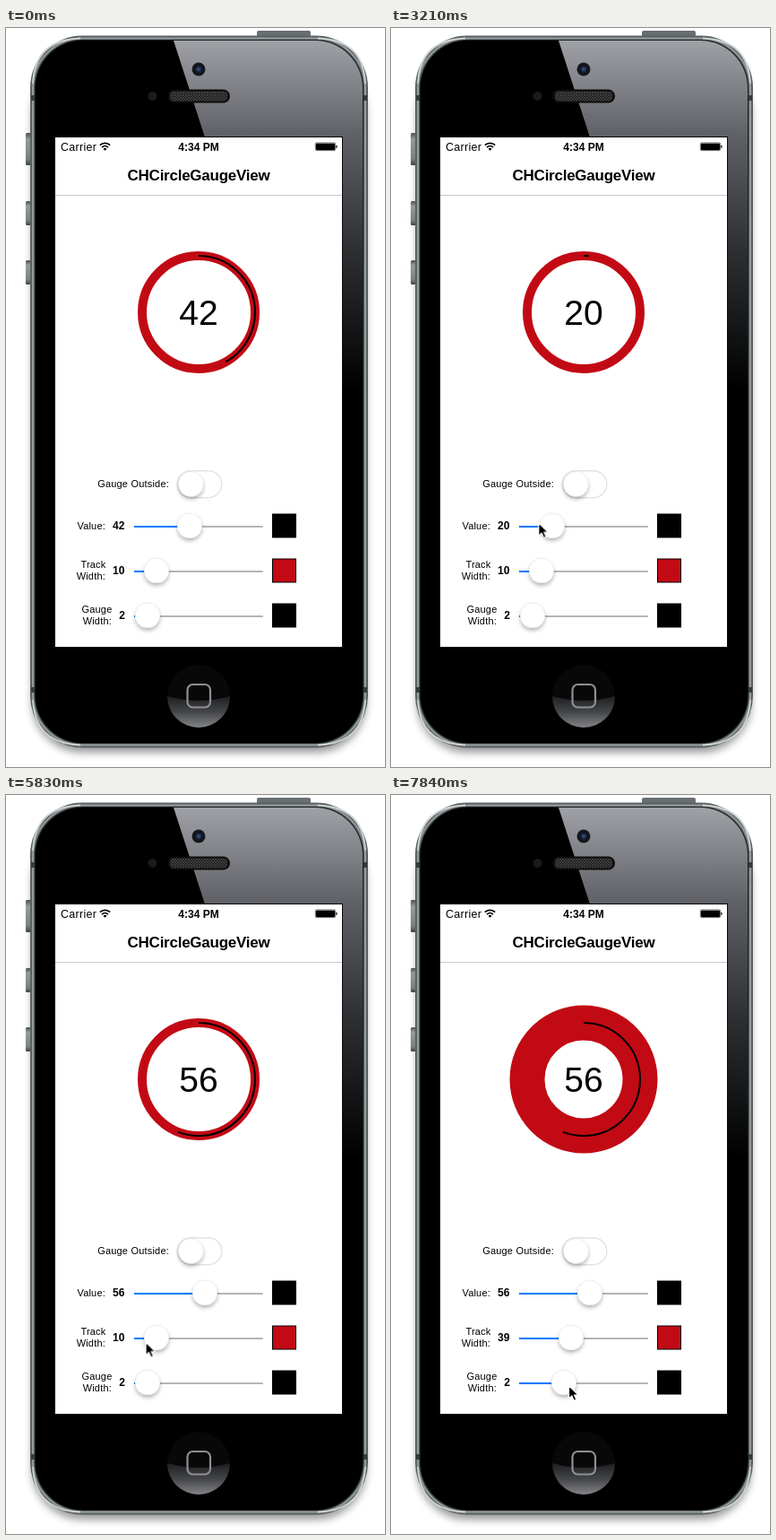
An HTML page for the animation above (8 s loop, 423 px wide and 824 px high).

```html
<!DOCTYPE html>
<html lang="en">
<head>
<meta charset="utf-8">
<title>Circle gauge demo</title>
<style>
html, body { margin: 0; width: 100%; height: 100%; overflow: hidden; background: #fff; }
svg { display: block; width: 423px; height: 824px; }
text { font-family: "Liberation Sans", Arial, Helvetica, sans-serif; }
.label { font-size: 11px; letter-spacing: .2px; text-anchor: end; }
.num { font-size: 12px; font-weight: bold; text-anchor: middle; }
.big { font-size: 39px; text-anchor: middle; }

.cursor, .value, .track, .gauge, .arc, .ring, .step { animation: 8s linear infinite; }
.cursor { animation-name: cursor; }
.value { animation-name: value; }
.track { animation-name: track; }
.gauge { animation-name: gauge; }
.arc { animation-name: arc; }
.ring { animation-name: ring; }
.step { animation-timing-function: step-end; }
.v42 { animation-name: v42; }
.v20 { animation-name: v20; }
.v56 { animation-name: v56; }
.t10 { animation-name: t10; }
.t39 { animation-name: t39; }

@keyframes cursor {
  0%, 12.8% { transform: translate(277px, 826px); }
  13.4% { transform: translate(276px, 812px); }
  16.5% { transform: translate(252px, 742px); }
  21.5% { transform: translate(210px, 639px); }
  22.9% { transform: translate(204px, 617px); animation-timing-function: ease-out; }
  31%, 32.75% { transform: translate(190.5px, 556px); animation-timing-function: ease-in-out; }
  37%, 38% { transform: translate(166px, 551px); animation-timing-function: ease-in-out; }
  45% { transform: translate(157px, 552px); animation-timing-function: ease-in-out; }
  50.25% { transform: translate(166.5px, 551px); }
  53% { transform: translate(177px, 551px); animation-timing-function: ease-in-out; }
  57.1%, 63.9% { transform: translate(218.5px, 551px); animation-timing-function: ease-in-out; }
  73.5%, 75.1% { transform: translate(155px, 610px); animation-timing-function: ease-in-out; }
  78.5%, 80.8% { transform: translate(188px, 611px); }
  84.6% { transform: translate(192px, 634px); animation-timing-function: ease-out; }
  89.5%, 92.6% { transform: translate(168px, 658px); }
  98%, 100% { transform: translate(198px, 658px); }
}
@keyframes value {
  0%, 32.75% { transform: translate(205px, 555px); animation-timing-function: ease-in-out; }
  37%, 53% { transform: translate(180px, 555px); animation-timing-function: ease-in-out; }
  57.1%, 100% { transform: translate(222px, 555px); }
}
@keyframes track {
  0%, 75.1% { transform: translate(168px, 605px); animation-timing-function: ease-in-out; }
  78.5%, 100% { transform: translate(201px, 605px); }
}
@keyframes gauge {
  0%, 92.6% { transform: translate(158px, 655px); }
  98%, 100% { transform: translate(193px, 655px); }
}
@keyframes arc {
  0%, 37.74% { stroke-dasharray: 42 100; }
  37.75% { stroke-dasharray: 0 100; animation-timing-function: ease-in-out; }
  50.25%, 57.59% { stroke-dasharray: 20 100; }
  57.6% { stroke-dasharray: 0 100; animation-timing-function: ease-in-out; }
  70.1%, 100% { stroke-dasharray: 56 100; }
}
@keyframes ring {
  0%, 79.95% { stroke-width: 10px; animation-timing-function: ease; }
  83.05%, 100% { stroke-width: 39px; }
}
@keyframes v42 { 0% { opacity: 1; } 37.75%, 100% { opacity: 0; } }
@keyframes v20 { 0% { opacity: 0; } 37.75% { opacity: 1; } 57.6%, 100% { opacity: 0; } }
@keyframes v56 { 0% { opacity: 0; } 57.6%, 100% { opacity: 1; } }
@keyframes t10 { 0% { opacity: 1; } 79.95%, 100% { opacity: 0; } }
@keyframes t39 { 0% { opacity: 0; } 79.95%, 100% { opacity: 1; } }
</style>
</head>
<body>
<svg viewBox="0 0 423 824" xmlns="http://www.w3.org/2000/svg">
  <defs>
    <linearGradient id="gloss" gradientUnits="userSpaceOnUse" x1="0" y1="14" x2="0" y2="405">
      <stop offset="0" stop-color="#a0a1a6"/>
      <stop offset=".27" stop-color="#606166"/>
      <stop offset=".6" stop-color="#2e2f32"/>
      <stop offset="1" stop-color="#000"/>
    </linearGradient>
    <linearGradient id="home" x1="0" y1="0" x2="0" y2="1">
      <stop offset="0" stop-color="#1d1e20"/>
      <stop offset=".5" stop-color="#444548"/>
      <stop offset="1" stop-color="#838488"/>
    </linearGradient>
    <linearGradient id="side" x1="0" y1="0" x2="0" y2="1">
      <stop offset="0" stop-color="#4a5052"/>
      <stop offset=".2" stop-color="#959b9d"/>
      <stop offset=".8" stop-color="#7b8183"/>
      <stop offset="1" stop-color="#3c4244"/>
    </linearGradient>
    <radialGradient id="lens">
      <stop offset="0" stop-color="#3f5f92"/>
      <stop offset=".5" stop-color="#1c2b48"/>
      <stop offset="1" stop-color="#0a0c12"/>
    </radialGradient>
    <pattern id="mesh" width="3" height="3" patternUnits="userSpaceOnUse">
      <rect width="3" height="3" fill="#1b1b1c"/>
      <path d="M0 0L3 3M3 0L0 3" stroke="#555658" stroke-width=".6"/>
    </pattern>
    <filter id="blur" x="-10%" y="-10%" width="120%" height="120%"><feGaussianBlur stdDeviation="5"/></filter>
    <filter id="lift" x="-40%" y="-40%" width="180%" height="190%">
      <feDropShadow dx="0" dy="3" stdDeviation="2" flood-color="#000" flood-opacity=".27"/>
    </filter>
    <clipPath id="face"><rect x="33" y="14" width="365" height="783" rx="53"/></clipPath>
    <clipPath id="lane"><rect x="143" y="530" width="144" height="150"/></clipPath>
    <g id="knob">
      <circle r="14" fill="#fff" filter="url(#lift)"/>
      <circle r="14" fill="none" stroke="#000" stroke-opacity=".12" stroke-width=".6"/>
    </g>
    <rect id="fill" x="-150" width="150" height="2" fill="#007aff"/>
    <rect id="rail" x="143" width="144" height="2" rx="1" fill="#b5b5b5"/>
  </defs>

  <!-- phone body -->
  <rect x="29" y="40" width="373" height="768" rx="56" fill="#000" opacity=".4" filter="url(#blur)"/>
  <g fill="url(#side)">
    <rect x="22" y="117" width="6" height="36" rx="1.5"/>
    <rect x="22" y="193" width="6" height="27" rx="1.5"/>
    <rect x="22" y="259" width="6" height="27" rx="1.5"/>
  </g>
  <rect x="280" y="3" width="60" height="7" rx="2" fill="#686e70"/>
  <rect x="27" y="8.500" width="377" height="794" rx="58" fill="#596163"/>
  <rect x="30" y="11.500" width="371" height="788" rx="55" fill="none" stroke="#959b9d" stroke-width="2"/>
  <g fill="none" stroke="#cfd2d3" stroke-width="1.800">
    <path d="M30 62Q32 13 83 11.500"/>
    <path d="M348 11.500Q399 13 401 62"/>
    <path d="M30 749Q32 798 83 799.500"/>
    <path d="M348 799.500Q399 798 401 749"/>
  </g>
  <g fill="#343b3d">
    <rect x="28" y="75" width="5" height="6"/>
    <rect x="398" y="75" width="5" height="6"/>
    <rect x="28" y="735" width="5" height="6"/>
    <rect x="398" y="735" width="5" height="6"/>
  </g>
  <rect x="32" y="13" width="367" height="785" rx="54" fill="#1b1e1f"/>
  <g clip-path="url(#face)">
    <rect x="33" y="14" width="365" height="783" fill="#000"/>
    <path d="M187 14L314 405H400V14Z" fill="url(#gloss)"/>
  </g>

  <!-- camera, speaker, home button -->
  <circle cx="215" cy="46" r="7.500" fill="#17181b"/>
  <circle cx="215" cy="46" r="5" fill="url(#lens)"/>
  <circle cx="163.500" cy="76" r="5" fill="#1a1a1b"/>
  <rect x="180" y="68.500" width="70" height="15" rx="7.500" fill="#0b0b0c"/>
  <rect x="183" y="70.500" width="64" height="11" rx="4" fill="url(#mesh)"/>
  <circle cx="215" cy="745" r="35" fill="#080809"/>
  <path d="M180 745Q215 755 250 745A35 35 0 0 1 180 745Z" fill="url(#home)"/>
  <rect x="202.500" y="732" width="25.500" height="25.500" rx="6" fill="none" stroke="#8f9093" stroke-width="2.200"/>

  <!-- screen -->
  <rect x="54" y="121" width="322" height="570" fill="#070708"/>
  <rect x="55" y="122" width="320" height="568" fill="#fff"/>
  <text x="61" y="136.500" font-size="12.500" letter-spacing=".3">Carrier</text>
  <g fill="none" stroke="#000" stroke-width="1.700">
    <path d="M104.800 130.700a8 8 0 0 1 11.400 0"/>
    <path d="M107 133.100a5 5 0 0 1 7 0"/>
  </g>
  <path d="M108.500 134.700a3 3 0 0 1 4 0l-2 2.100z"/>
  <text x="215" y="136.500" font-size="12" font-weight="bold" text-anchor="middle">4:34 PM</text>
  <rect x="345.300" y="128" width="22.400" height="8.600" rx="1.500" fill="none" stroke="#000" stroke-width=".6"/>
  <rect x="346" y="128.700" width="21" height="7.200" rx=".8"/>
  <rect x="368.300" y="130.800" width="1.200" height="3" rx=".6"/>
  <text x="215" y="170" font-size="17" font-weight="bold" letter-spacing="-.25" text-anchor="middle">CHCircleGaugeView</text>
  <rect x="55" y="186" width="320" height="1" fill="#c9c9c9"/>

  <!-- gauge -->
  <circle class="ring" cx="215" cy="317" r="63" fill="none" stroke="#c20a14" stroke-width="10"/>
  <circle class="arc" cx="215" cy="317" r="63" fill="none" stroke="#000" stroke-width="2"
          pathLength="100" stroke-dasharray="42 100" transform="rotate(-90 215 317)"/>
  <g class="big">
    <text class="step v42" x="215" y="330.500">42</text>
    <text class="step v20" x="215" y="330.500">20</text>
    <text class="step v56" x="215" y="330.500">56</text>
  </g>

  <!-- controls -->
  <g class="label">
    <text x="182" y="512">Gauge Outside:</text>
    <text x="111" y="559">Value:</text>
    <text x="111.500" y="602">Track</text>
    <text x="111" y="615">Width:</text>
    <text x="118.500" y="652">Gauge</text>
    <text x="118" y="665">Width:</text>
  </g>
  <g class="num">
    <text class="step v42" x="125.700" y="559">42</text>
    <text class="step v20" x="125.700" y="559">20</text>
    <text class="step v56" x="125.700" y="559">56</text>
    <text class="step t10" x="125.700" y="609">10</text>
    <text class="step t39" x="125.700" y="609">39</text>
    <text x="129.500" y="659">2</text>
  </g>
  <rect x="191.200" y="493.700" width="49.600" height="30" rx="15" fill="#fff" stroke="#e3e3e3" stroke-width="1.500"/>
  <use href="#knob" x="206.500" y="508.500"/>
  <use href="#rail" y="555"/>
  <use href="#rail" y="605"/>
  <use href="#rail" y="655"/>
  <g clip-path="url(#lane)">
    <g class="value"><use href="#fill"/></g>
    <g class="track"><use href="#fill"/></g>
    <g class="gauge"><use href="#fill"/></g>
  </g>
  <g class="value"><use href="#knob"/></g>
  <g class="track"><use href="#knob"/></g>
  <g class="gauge"><use href="#knob"/></g>
  <rect x="297" y="541.500" width="27" height="27"/>
  <rect x="297.500" y="592" width="26" height="26" fill="#c20a14" stroke="#000"/>
  <rect x="297" y="641.500" width="27" height="27"/>

  <g class="cursor">
    <path d="M.5 .5V15.200L3.900 12L6.300 17.400L8.900 16.300L6.600 11.100H11Z" stroke="#fff" stroke-width="1.200" stroke-linejoin="round"/>
  </g>
</svg>
</body>
</html>
```
